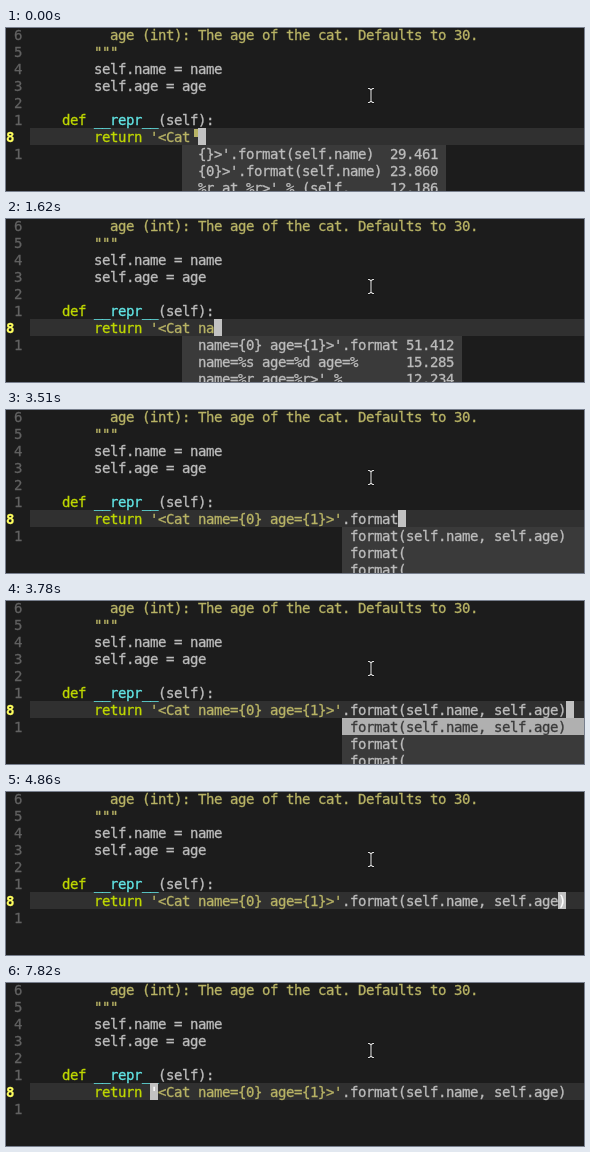
Animation of 578 by 163 pixels, one loop 8000 ms. Source, as an HTML page:

```html
<!DOCTYPE html>
<html lang="en">
<head>
<meta charset="utf-8">
<title>Code completion</title>
<style>
html, body { margin: 0; width: 100%; height: 100%; overflow: hidden; background: #1c1c1c; }
svg { display: block; }
text { font: 14px "DejaVu Sans Mono", monospace; white-space: pre; stroke-width: .3; }
.bold { font-weight: bold; }
</style>
</head>
<body>
<svg id="stage" width="578" height="163" viewBox="0 0 578 163">
  <defs>
    <path id="beam" d="M362 60.5h1.5l1.5 1.5 1.5-1.5h1.5M365 62v11M362 74.5h1.5l1.5-1.5 1.5 1.5h1.5" fill="none"/>
  </defs>
  <rect width="578" height="163" fill="#1c1c1c"/>
  <rect x="24" y="100" width="554" height="17" fill="#303030"/>
  <g id="page"></g>
  <g id="live"></g>
  <use href="#beam" stroke="#111" stroke-width="3"/>
  <use href="#beam" stroke="#ddd" stroke-width="1.1"/>
</svg>
<script>
const NS = 'http://www.w3.org/2000/svg';
const CELL = 8, ROW = 17, LINE = 100, CODE = 144, LOOP = 8000;
const C = {
  plain: '#bcbcbc', string: '#b8b365', key: '#bfd800', func: '#62e6e6',
  num: '#626262', active: '#ffff5f', menu: '#3a3a3a', pick: '#b0b0b0',
  cursor: '#c2c2c2', under: '#ffffff'
};
const page = document.getElementById('page');
const live = document.getElementById('live');

function add(parent, tag, attrs) {
  const el = document.createElementNS(NS, tag);
  for (const k in attrs) el.setAttribute(k, attrs[k]);
  parent.appendChild(el);
  return el;
}
const rect = (g, x, y, width, height, fill) => add(g, 'rect', { x, y, width, height, fill });

// One glyph per terminal cell, y is the top of the row.
function write(g, x, y, str, fill) {
  const xs = Array.from(str, (_, i) => x + i * CELL).join(' ');
  const el = add(g, 'text', { x: xs, y: y + 14, fill, stroke: fill });
  el.textContent = str;
  return el;
}

function drawPage() {
  ['6', '5', '4', '3', '2', '1'].forEach((n, i) => write(page, 8, -2 + i * ROW, n, C.num));
  write(page, 0, LINE, '8', C.active).classList.add('bold');
  write(page, 8, LINE + ROW, '1', C.num);
  write(page, 104, -2, 'age (int): The age of the cat. Defaults to 30.', C.string);
  write(page, 88, 15, '"""', C.string);
  write(page, 88, 32, 'self.name = name', C.plain);
  write(page, 88, 49, 'self.age = age', C.plain);
  write(page, 56, 83, 'def', C.key);
  write(page, 88, 83, '__repr__', C.func);
  write(page, 152, 83, '(self):', C.plain);
  write(page, 88, LINE, 'return', C.key);
}

const full = "'<Cat name={0} age={1}>'";
const call = '.format', args = '(self.name, self.age)';
const menus = {
  cat: { x: 176, w: 264, tx: 192, nx: 384, rows: [
    ["{}>'.format(self.name)", '29.461'],
    ["{0}>'.format(self.name)", '23.860'],
    ["%r at %r>' % (self.", '12.186']] },
  name: { x: 176, w: 280, tx: 192, nx: 400, rows: [
    ["name={0} age={1}>'.format", '51.412'],
    ['name=%s age=%d age=%', '15.285'],
    ["name=%r age=%r>' %", '12.234']] },
  args: { x: 336, w: 242, tx: 344, rows: [
    ['format(self.name, self.age)'], ['format('], ['format(']] }
};

// at: start time, str + code: line content, cur: cursor x
const steps = [
  { at: 0, str: "'<Cat ", code: '', cur: 192, menu: 'cat', mark: true },
  { at: 1080, str: "'<Cat na", code: '', cur: 208, menu: 'cat' },
  { at: 1620, str: "'<Cat na", code: '', cur: 208, menu: 'name' },
  { at: 2160, str: full, code: call, cur: 392, menu: 'name', pick: true },
  { at: 3510, str: full, code: call, cur: 392, menu: 'args' },
  { at: 3780, str: full, code: call + args, cur: 560, menu: 'args', pick: true },
  { at: 4590, str: full, code: call + args, cur: 552, menu: 'args', pick: true },
  { at: 4860, str: full, code: call + args, cur: 552 },
  { at: 6470, str: full, code: call + args, cur: 152 },
  { at: 7820, str: full, code: call + args, cur: 144 }
];

function drawMenu(m, picked) {
  rect(live, m.x, 117, m.w, 46, C.menu);
  if (picked) rect(live, m.x, 117, m.w, ROW, C.pick);
  m.rows.forEach(([label, score], i) => {
    const y = 117 + i * ROW;
    const fill = picked && i === 0 ? C.menu : C.plain;
    write(live, m.tx, y, label, fill);
    if (score) write(live, m.nx, y, score, fill);
  });
}

function drawStep(s) {
  live.replaceChildren();
  write(live, CODE, LINE, s.str, C.string);
  if (s.code) write(live, CODE + s.str.length * CELL, LINE, s.code, C.plain);
  if (s.mark) rect(live, 188, 101, 4, 8, C.string);
  rect(live, s.cur, LINE, CELL, ROW, C.cursor);
  const under = (s.str + s.code)[(s.cur - CODE) / CELL];
  if (under) write(live, s.cur, LINE, under, C.under);
  if (s.menu) drawMenu(menus[s.menu], s.pick);
}

let shown = null;
function render(t) {
  const step = steps.findLast(s => s.at <= t);
  if (step !== shown) drawStep(shown = step);
}

drawPage();
render(0);
const start = performance.now();
function tick() {
  render((performance.now() - start) % LOOP);
  requestAnimationFrame(tick);
}
requestAnimationFrame(tick);
</script>
</body>
</html>
```
